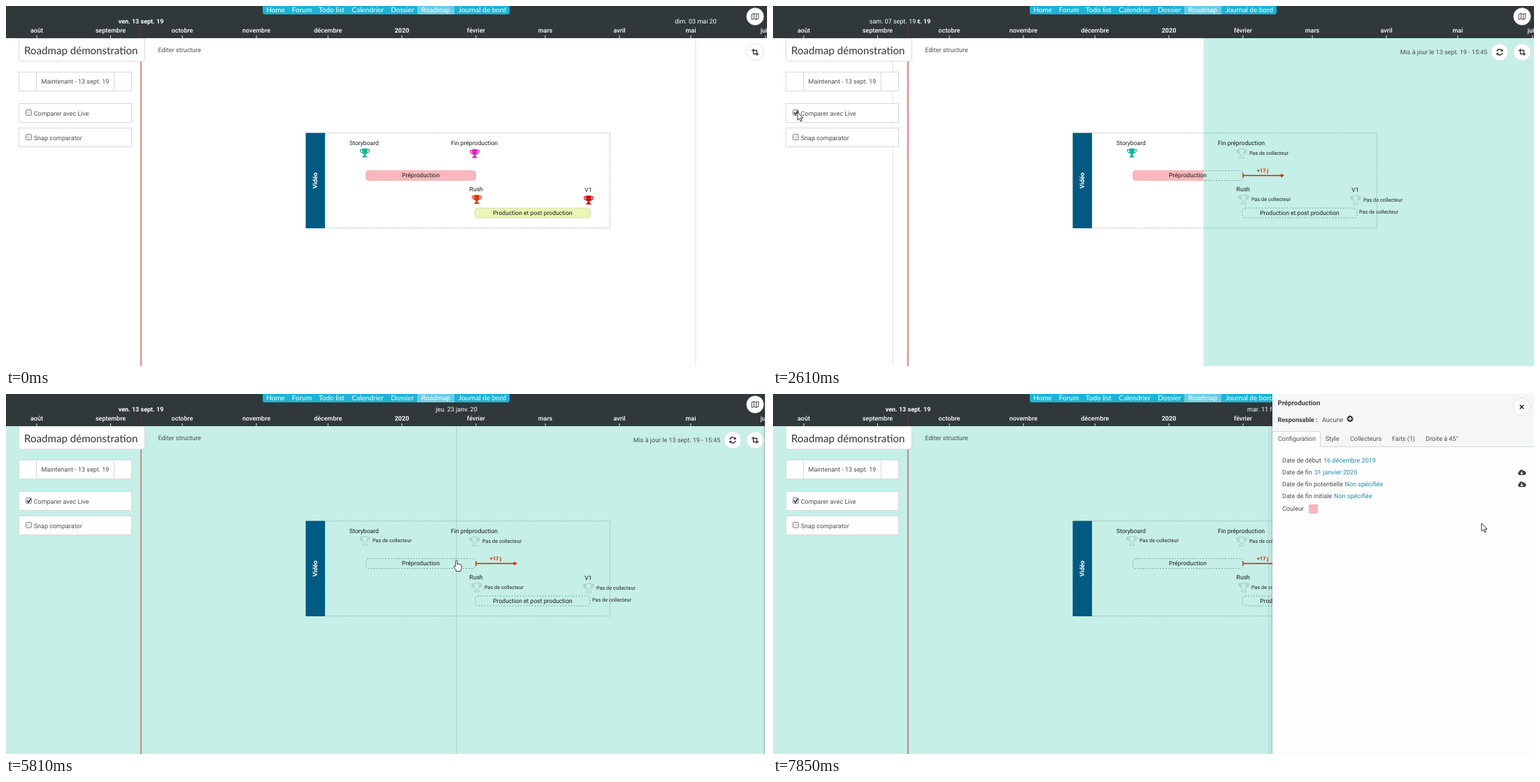
These frames come from a looping animation (1088 by 515 pixels, 8 s). An HTML page:

```html
<!DOCTYPE html>
<html lang="fr">
<head>
<meta charset="utf-8">
<title>Roadmap</title>
<style>
html, body { margin: 0; width: 100%; height: 100%; overflow: hidden; background: #fff; }
svg { display: block; width: 1088px; height: 515px; font-family: Roboto, sans-serif; font-size: 9px; text-rendering: geometricPrecision; }
.nav, .title { font-family: Lato, sans-serif; }
.nav { font-size: 10px; }
.title { font-size: 15.1px; }
.item { font-size: 8.6px; }
.note { font-size: 7.3px; }
</style>
</head>
<body>
<svg id="stage" viewBox="0 0 1088 515" xmlns="http://www.w3.org/2000/svg"></svg>
<script>
const LOOP = 8000, DAY0 = 565.7, DAY = 3.413, PANEL = 714;
const DAYS = ['dim.', 'lun.', 'mar.', 'mer.', 'jeu.', 'ven.', 'sam.'];
const MONTHS = ['janv.', 'févr.', 'mars', 'avr.', 'mai', 'juin', 'juil.', 'août', 'sept.', 'oct.', 'nov.', 'déc.'];

// ---- drawing helpers ----
const text = (x, y, s, fill = '#4d4d4d', extra = '') => `<text x="${x}" y="${y}" fill="${fill}" ${extra}>${s}</text>`;
const mid = (x, y, s, fill, extra = '') => text(x, y, s, fill, `text-anchor="middle" ${extra}`);
const rect = (x, y, w, h, fill, extra = '') => `<rect x="${x}" y="${y}" width="${w}" height="${h}" fill="${fill}" ${extra}/>`;
const path = (d, fill = 'none', extra = '') => `<path d="${d}" fill="${fill}" ${extra}/>`;
const at = (x, y, s, extra = '') => `<g transform="translate(${x} ${y})" ${extra}>${s}</g>`;
const group = (id, s, extra = '') => `<g id="${id}" ${extra}>${s}</g>`;
const box = (y, h = 27) => rect(18.5, y + .5, 161, h, '#fff', 'stroke="#d6d9d9"');
const button = (x, y, icon) => at(x, y, `<circle r="12.2" fill="#fff" stroke="#d9dcdc" stroke-width=".8"/>` + icon);
const bold = 'font-weight="700"', medium = 'font-weight="500"';

const CUP = 'M-3.7-6.2H3.7V-5H7V-3.3C7-.8 4.8.5 2.8.9 2.1 1.8 1.1 2.2 1.1 3.2 1.1 4.2 3.4 4 3.6 6.4H-3.6C-3.4 4-1.1 4.2-1.1 3.2-1.1 2.2-2.1 1.8-2.8.9-4.8.5-7-.8-7-3.3V-5H-3.7Z'
  + 'M-5.8-3.8V-3.2C-5.8-2-4.6-.8-3.3-.5-3.6-1.6-3.8-2.7-3.8-3.8ZM5.8-3.8H3.8C3.8-2.7 3.6-1.6 3.3-.5 4.6-.8 5.8-2 5.8-3.2Z';
const trophy = (x, y, color) => at(x, y, path(CUP, color, 'fill-rule="evenodd"'));
const ghost = (x, y) => at(x, y, path(CUP, 'none', 'stroke="#9dbcb7" stroke-width=".7"'));
const dotted = (x, y, w, h) => rect(x, y, w, h, 'none', 'rx="4" stroke="#58807b" stroke-dasharray="1.3 2.7"');

const MAP = path('M-4.8-3.2-1.6-4.3 1.6-3.2 4.8-4.3V3.2L1.6 4.3-1.6 3.2-4.8 4.3ZM-1.6-4.3V3.2M1.6-3.2V4.3', 'none', 'stroke="#444"');
const CROP = path('M-2.5-5V2.5H5M-5-2.5H2.5V5', 'none', 'stroke="#333" stroke-width="1.3"');
const SYNC = path('M-4-.8A4 4 0 0 1 3-2.7M4 .8A4 4 0 0 1-3 2.7', 'none', 'stroke="#222" stroke-width="1.4"')
  + path('M4.5-4.6V-1H.9ZM-4.5 4.6V1H-.9Z', '#222');
const CLOUD = path('M-3 4A2.6 2.6 0 0 1-3.7-1 3.4 3.4 0 0 1 2.6-2 2.9 2.9 0 0 1 3.4 4Z', '#3c3c3c')
  + path('M0-1.4V2M-1.8.8 0 2.6 1.8.8', 'none', 'stroke="#fff" stroke-width="1.1"');
const ARROW = path('M0 0V11.3L2.6 8.9 4.5 13 6.3 12.2 4.5 8.2H8Z', '#fff', 'stroke="#222" stroke-width=".9"');
const HAND = path('M-1.2 1.2C-1.2-.4 1.2-.4 1.2 1.2V5.6C1.5 4.5 3.3 4.8 3.3 6 3.8 5 5.3 5.4 5.3 6.5 6 5.7 7.4 6.2 7.4 7.4V10.5C7.4 12 6.3 13 6.2 15.5H-.2C-.5 13.3-2.5 11.8-3.7 9.5-4.2 8-2.6 7.4-1.2 9.1Z', '#fff', 'stroke="#222" stroke-width=".9" stroke-linejoin="round"');

// ---- parts of the page ----
function header() {
  const months = [['août', 44], ['septembre', 149.5], ['octobre', 252], ['novembre', 358], ['décembre', 460.3], ['2020', 566],
    ['février', 672], ['mars', 771], ['avril', 877], ['mai', 979], ['juin', 1086]];
  const links = [['Home', 385.5], ['Forum', 423], ['Todo list', 465.5], ['Calendrier', 517.3], ['Dossier', 566.8], ['Roadmap', 614.3], ['Journal de bord', 681]];
  return rect(0, 0, 1088, 46, '#30383a')
    + path('M193 27V46', 'none', 'stroke="#7d2b2d"')
    + months.map(([s, x]) => mid(x, 38.3, s, '#fff', s === '2020' ? bold : medium) + rect(x - .5, 42, 1, 4, '#dfe2e2')).join('')
    + path('M367 0H720V9Q720 12 717 12H370Q367 12 367 9Z', '#1cb3d5')
    + rect(588, 0, 53, 12, '#6acde4')
    + links.map(([s, x]) => mid(x, 9.2, s, '#fff', 'class="nav"')).join('')
    + mid(193, 24.6, 'ven. 13 sept. 19', '#fff', bold)
    + group('day', rect(-35, 16, 70, 11, '#30383a') + `<text id="date" y="24.6" fill="#fff" text-anchor="middle"></text>`)
    + button(1071, 15, MAP);
}

function plan() {
  return trophy(513, 210, '#12b896') + trophy(670, 211, '#e224b4') + trophy(673, 276.5, '#d83a10') + trophy(833, 277.5, '#d00b0b')
    + rect(514.5, 235.5, 157, 14, '#f9b6bd', 'rx="4" stroke="#ecb0b6" stroke-width=".8"')
    + rect(670.5, 289, 165, 14, '#ebf5b4', 'rx="4" stroke="#d0d6b0" stroke-width=".8"');
}

function live() {
  const cups = [[513, 210, 524, 212], [670, 211, 681, 213.3], [673, 276.5, 684, 278.6], [833, 277.5, 844, 279.6]];
  const note = (x, y) => text(x, y, 'Pas de collecteur', '#222', 'class="note"');
  return rect(0, 46, 1088, 469, '#c5efe7')
    + rect(192.5, 46, 1, 469, '#a8302c')
    + cups.map(([x, y, tx, ty]) => ghost(x, y) + note(tx, ty)).join('') + note(838, 296.6)
    + dotted(514.5, 235.5, 157, 14) + dotted(671, 289, 164, 14)
    + path('M672 242.5H727M672 239V246', 'none', 'stroke="#e01a00" stroke-width="1.3"')
    + path('M726 239.8 731 242.5 726 245.2Z', '#e01a00')
    + mid(700, 238, '+17 j', '#e01a00', 'font-weight="700" style="font-size:7.4px"');
}

function labels() {
  const item = (x, y, s) => mid(x, y, s, '#1c1c1c', 'class="item"');
  return rect(456, 181.8, 407.5, 136, 'none', 'stroke="#8b9694" stroke-width=".8" stroke-dasharray="1.2 1.2"')
    + rect(428.5, 181.5, 27.5, 136.5, '#005a82')
    + at(445, 249.7, mid(0, 0, 'Vidéo', '#fff', bold), '').replace('translate(445 249.7)', 'translate(445 249.7) rotate(-90)')
    + item(512, 198.8, 'Storyboard') + item(669.5, 199.4, 'Fin préproduction') + item(672.2, 264.8, 'Rush') + item(832.5, 265.6, 'V1')
    + item(593, 245.2, 'Préproduction') + item(753, 298.6, 'Production et post production');
}

function sidebar() {
  const check = y => rect(28.5, y, 8, 8, '#e6e6e6', 'rx="1" stroke="#8d8d8d"');
  return path('M18.5 46V74Q18.5 79 23.5 79H193.5Q198.5 79 198.5 74V46Z', '#fff', 'stroke="#d6d9d9"')
    + text(26, 68.6, 'Roadmap démonstration', '#333', 'class="title"')
    + text(217.5, 65.8, 'Editer structure')
    + box(94) + path('M43.5 95V121M154.5 95V121', 'none', 'stroke="#d6d9d9"') + mid(99, 111, 'Maintenant - 13 sept. 19')
    + box(139) + check(148.5) + text(39.7, 157, 'Comparer avec Live')
    + box(174) + check(183.5) + text(39.7, 192, 'Snap comparator')
    + group('tick', path('M30 152.5 32 155 35.6 149.8', 'none', 'stroke="#25384c" stroke-width="1.6"'));
}

function panel() {
  const row = (y, s, x, value) => text(14, y, s) + text(x, y, value, '#1c8fae');
  const tabs = [['Configuration', 8], ['Style', 76], ['Collecteurs', 111], ['Faits (1)', 171], ['Droite à 45°', 219]];
  return rect(-3, 0, 3, 515, '#000', 'opacity=".05"') + rect(-1, 0, 1, 515, '#000', 'opacity=".14"')
    + rect(0, 0, 374, 515, '#fdfdfd') + rect(0, 0, 374, 75, '#f5f6f6')
    + path('M374 75.5H68.5V53.5H0', '#fdfdfd', 'stroke="none"') + rect(0, 53, 68.5, 23, '#fdfdfd')
    + rect(68.5, 53, 306, 22.5, '#f5f6f6')
    + path('M0 53.5H68.5V75.5H374', 'none', 'stroke="#d5d8d8"')
    + text(7.5, 15.6, 'Préproduction', '#3a3f41', 'font-weight="700" style="font-size:9.5px"')
    + text(7.5, 39.5, 'Responsable :', '#3a3f41', bold) + text(71, 39.5, 'Aucune')
    + at(111, 35.5, '<circle r="4.4" fill="#333"/>' + path('M-2.6 0H2.6M0-2.6V2.6', 'none', 'stroke="#fff" stroke-width="1.3"'))
    + tabs.map(([s, x]) => text(x, 67, s)).join('')
    + row(97.8, 'Date de début', 73, '16 décembre 2019')
    + row(114.8, 'Date de fin', 60, '31 janvier 2020')
    + row(131.9, 'Date de fin potentielle', 103.5, 'Non spécifiée')
    + row(149, 'Date de fin initiale', 88, 'Non spécifiée')
    + text(14, 167.2, 'Couleur') + rect(52, 158, 13, 13, '#f9b6bd')
    + at(356.5, 112, CLOUD) + at(356.5, 129, CLOUD)
    + button(356.5, 18.5, path('M-2.7-2.7 2.7 2.7M2.7-2.7-2.7 2.7', 'none', 'stroke="#222" stroke-width="1.6"'));
}

const stage = document.getElementById('stage');
stage.innerHTML = '<defs><clipPath id="wipe"><rect id="edge" width="1088" height="515"/></clipPath></defs>'
  + rect(0, 0, 1088, 515, '#fff') + rect(192.3, 46, 1.3, 469, '#cf4a46')
  + plan() + group('live', live(), 'clip-path="url(#wipe)"') + labels()
  + rect(0, 46, 1, 469, '#000', 'id="line" opacity=".13"')
  + sidebar()
  + group('sync', text(896.8, 69, 'Mis à jour le 13 sept. 19 - 15:45') + button(1039, 66, SYNC))
  + button(1071, 66, CROP)
  + header() + group('panel', panel())
  + group('arrow', ARROW) + group('hand', HAND);

const el = {};
stage.querySelectorAll('[id]').forEach(n => el[n.id] = n);

// ---- motion ----
const MOUSE = [[0, 986, 517], [230, 986, 517], [1030, 108, 177], [1420, 35, 146], [1840, 35, 146], [1890, 35, 147.5], [2050, 35, 147.5],
  [2130, 35, 152], [2860, 35, 152], [3240, 593.6, 329], [3660, 651, 300], [3840, 644, 231], [4310, 644, 231], [4430, 644, 238],
  [6560, 644, 238], [7330, 924, 226], [7850, 1013, 185], [8000, 1013, 185]];

const slope = (i, k) => (MOUSE[i + 1][k] - MOUSE[i][k]) / (MOUSE[i + 1][0] - MOUSE[i][0]);
function tangent(i, k) {
  if (i === 0 || i === MOUSE.length - 1) return 0;
  const a = slope(i - 1, k), b = slope(i, k);
  return a * b > 0 ? 2 * a * b / (a + b) : 0;
}
// Monotone cubic through the pointer stops.
function mouse(t, k) {
  let i = 0;
  while (i < MOUSE.length - 2 && t >= MOUSE[i + 1][0]) i++;
  const a = MOUSE[i], b = MOUSE[i + 1], h = b[0] - a[0], u = (t - a[0]) / h, v = 1 - u;
  return a[k] * (1 + 2 * u) * v * v + b[k] * u * u * (3 - 2 * u)
    + h * (tangent(i, k) * u * v * v - tangent(i + 1, k) * u * u * v);
}

const swing = (t, start, span) => .5 - Math.cos(Math.PI * Math.min(1, Math.max(0, (t - start) / span))) / 2;
const show = (node, on) => node.setAttribute('visibility', on ? 'visible' : 'hidden');
const move = (node, x, y = 0) => node.setAttribute('transform', `translate(${x.toFixed(2)} ${y.toFixed(2)})`);

function dateAt(x) {
  const d = new Date(Date.UTC(2020, 0, 1 + Math.floor((x - DAY0) / DAY)));
  return `${DAYS[d.getUTCDay()]} ${String(d.getUTCDate()).padStart(2, '0')} ${MONTHS[d.getUTCMonth()]} ${d.getUTCFullYear() % 100}`;
}

function draw(t) {
  const x = mouse(t, 1), y = mouse(t, 2);
  const hover = Math.min(Math.max(x, 171), t > 5000 ? 708.8 : 1088);
  const onBar = t > 4000 && x > 514 && x < 672 && y > 235 && y < 250;
  move(el.arrow, x, y);
  move(el.hand, x, y);
  show(el.arrow, !onBar);
  show(el.hand, onBar);
  el.line.setAttribute('x', Math.round(hover) - .5);
  move(el.day, hover);
  const s = dateAt(hover);
  if (el.date.textContent !== s) el.date.textContent = s;
  show(el.tick, t >= 2050);
  show(el.sync, t >= 2150);
  el.edge.setAttribute('x', 1088 * (1 - swing(t, 2153, 1000)));
  const slide = swing(t, 5754, 1000);
  show(el.panel, slide > 0);
  move(el.panel, 1088 - (1088 - PANEL) * slide);
}

const begin = performance.now();
function tick() {
  draw((performance.now() - begin) % LOOP);
  requestAnimationFrame(tick);
}
draw(0);
requestAnimationFrame(tick);
</script>
</body>
</html>
```
